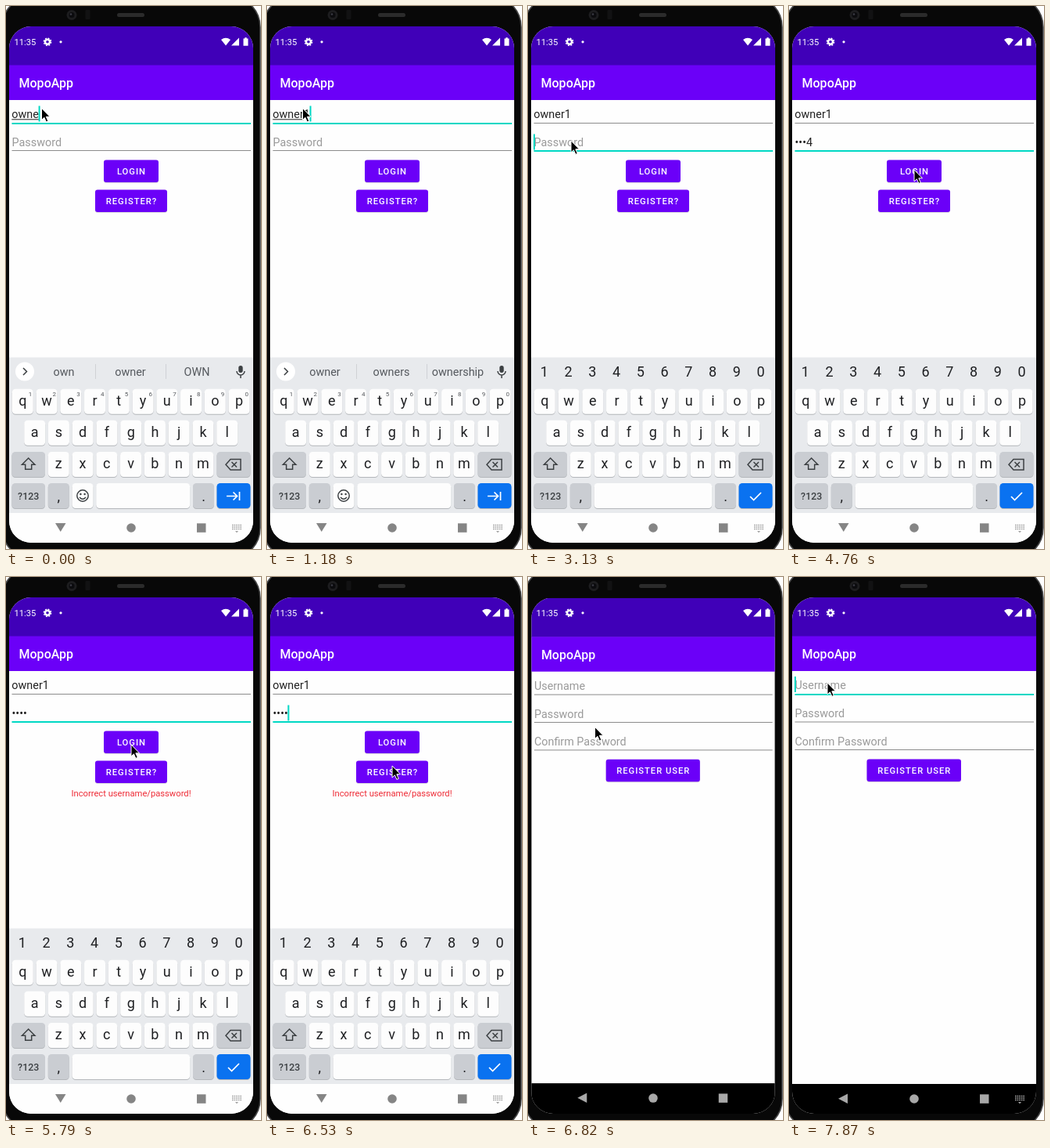
These frames come from a looping animation (326x693 px, 8000 ms). An HTML page:

```html
<!DOCTYPE html>
<html lang="en">
<head>
<meta charset="utf-8">
<title>Login screen</title>
<style>
  html, body { margin: 0; width: 100%; height: 100%; overflow: hidden; background: #fff; }
  svg { display: block; width: 326px; height: 693px; font-family: Roboto, sans-serif; }
  text { white-space: pre; }
  .mid { text-anchor: middle; }
  .field { font-size: 14.4px; fill: #222; }
  .hint { font-size: 14.4px; fill: #9a9a9a; }
  .button { font-size: 11.2px; font-weight: 500; letter-spacing: 1px; fill: #fff; text-anchor: middle; }
  .key { font-size: 18px; fill: #1f2023; text-anchor: middle; }
  .super { font-size: 8px; fill: #55585c; text-anchor: middle; }
  .word { font-size: 14.4px; fill: #55595e; text-anchor: middle; }
  .line { fill: none; stroke: #3c4043; stroke-width: 1.5; }
</style>
</head>
<body>
<svg id="stage" viewBox="0 0 326 693"></svg>
<script>
const LOOP = 8000;
const PURPLE = '#6b00f8', DARK = '#4000b8', TEAL = '#00d8c4', GRAY = '#cacdd2';
const PITCH = 30.75;

const rect = (x, y, w, h, fill, more = '') =>
  `<rect x="${x}" y="${y}" width="${w}" height="${h}" fill="${fill}" ${more}/>`;
const label = (x, y, cls, str, more = '') =>
  `<text x="${x}" y="${y}" class="${cls}" ${more}>${str}</text>`;
const path = (d, more = 'class="line"') => `<path d="${d}" ${more}/>`;
const dot = (x, y, r, fill) => `<circle cx="${x}" cy="${y}" r="${r}" fill="${fill}"/>`;

const button = (x, y, w, str) =>
  rect(x, y + 1, w, 28.5, '#000', 'rx="3" opacity=".13"') +
  rect(x, y, w, 28.5, PURPLE, 'rx="3"') +
  label(x + w / 2 + .5, y + 18.3, 'button', str);

const key = (x, y, w, fill = '#fdfdfd') =>
  rect(x, y + 1, w, 32, '#b4b7bb', 'rx="4.5"') + rect(x, y, w, 32, fill, 'rx="4.5"');

const keyRow = (chars, x, y) => [...chars].map((c, i) =>
  key(x + i * PITCH, y, 27) + label(x + i * PITCH + 13.5, y + 21.3, 'key', c)).join('');

const digits = (draw) => [...'1234567890'].map((c, i) => draw(c, i * PITCH)).join('');

const header =
  rect(4, 26, 312, 50, DARK) + rect(4, 75.5, 312, 44.5, PURPLE) +
  label(16.5, 104, '', 'MopoApp', 'font-size="16" font-weight="500" fill="#fff"');

const underline = (id, y) => rect(7.5, y, 305.5, 1, '#8c8c8c', `id="${id}"`);

function navBar(fill, icon, back) {
  return rect(4, 647, 312, 40, fill) + path(back, `fill="${icon}"`) +
    dot(160, 666, 5.8, icon) + rect(244, 660.3, 11.5, 11.5, icon);
}

const keyboardIcon = (color) =>
  path('M289 662.5h12M289 665h12M289 667.5h12',
    `stroke="${color}" stroke-width="1.6" stroke-dasharray="1.6 1"`) +
  path('M293 670h4l-2 2.3z', `fill="${color}"`);

const loginPage =
  rect(4, 26, 312, 660, '#fefefe') + header +
  label(7.3, 143, 'field', '', 'id="user"') +
  rect(7.3, 144.3, 0, 1, '#222', 'id="comp"') + underline('line1', 149) +
  label(7.5, 179, 'hint', 'Password', 'id="passHint"') +
  label(7.5, 179, 'field', '', 'id="pass"') + underline('line2', 184) +
  button(125, 196.5, 70, 'LOGIN') +
  rect(125, 196.5, 70, 28.5, '#fff', 'rx="3" id="press1"') +
  button(114, 234.5, 92, 'REGISTER?') +
  rect(114, 234.5, 92, 28.5, '#fff', 'rx="3" id="press2"') +
  label(160, 280, 'mid', 'Incorrect username/password!', 'id="error" font-size="11.2" fill="#ee2b36"') +
  rect(0, 127, 2, 20, TEAL, 'id="caret"');

const textMode =
  dot(24, 466.5, 12, '#fff') + path('M22 462l4.5 4.5-4.5 4.5') +
  [74, 159, 244].map((x, i) => label(x, 472, 'word', '', `id="word${i}"`)).join('') +
  path('M114.5 457v19M204.5 457v19', 'id="dividers" stroke="#cfd1d5"') +
  rect(297.3, 459, 5.4, 9, '#3c4043', 'rx="2.7"') +
  path('M295 466a5 5 0 0 0 10 0M300 471v4') +
  digits((c, dx) => label(31 + dx, 497.5, 'super', c)) +
  key(84.5, 609, 27) + `<circle cx="98" cy="625" r="7.2" class="line"/>` +
  dot(95.4, 623, 1.2, '#3c4043') + dot(100.6, 623, 1.2, '#3c4043') +
  path('M94 627q4 4.5 8 0') + key(115.2, 609, 120) +
  path('M282 625.5h13.5m-5-5l5 5-5 5M298.5 620v11', 'fill="none" stroke="#fff" stroke-width="1.7"');

const passMode =
  digits((c, dx) => label(20.8 + dx, 473, 'key', c)) + key(84.5, 609, 150.7) +
  path('M284 626l4.5 4.5 9.5-9.5', 'fill="none" stroke="#fff" stroke-width="1.7"');

const keyboard =
  rect(4, 448.5, 312, 199, '#e8eaed') +
  keyRow('qwertyuiop', 7.8, 488.7) + keyRow('asdfghjkl', 23.2, 528.7) + keyRow('zxcvbnm', 53.8, 569) +
  key(7.5, 569, 42.5, GRAY) + path('M28.7 577l-8.2 8.2h4.2v6h8v-6h4.2z') +
  key(269.5, 569, 43, GRAY) + path('M287 578.5h13v13.5h-13l-6-6.75zM288.5 582l6.5 6.5m0-6.5l-6.5 6.5') +
  key(7.5, 609, 42.5, GRAY) + label(28.7, 630, 'mid', '?123', 'font-size="12.4" font-weight="500" fill="#3c4043"') +
  key(53.8, 609, 27, GRAY) + label(67.3, 632, 'key', ',') +
  key(239, 609, 27, GRAY) + label(252.5, 632, 'key', '.') +
  key(269.5, 609, 43, '#0a72f0') +
  `<g id="textMode">${textMode}</g><g id="passMode">${passMode}</g>` +
  navBar('#fefefe', '#858585', 'M63 660h13.5l-6.75 11z') + keyboardIcon('#a0a0a0');

const registerPage =
  rect(4, 26, 312, 660, '#fefefe') + header +
  ['Username', 'Password', 'Confirm Password'].map((s, i) =>
    label(7.5, 143 + i * 36, 'hint', s) + underline('reg' + i, 149 + i * 35.5)).join('') +
  button(99.5, 232.5, 120.5, 'REGISTER USER') +
  rect(7, 127, 2, 20, TEAL, 'id="regCaret"') +
  navBar('#000', '#a8a8a8', 'M75 659.5v12.5l-12-6.25z') +
  `<g id="regIcon">${keyboardIcon('#a8a8a8')}</g>`;

const statusIcons =
  label(10.5, 50, '', '11:35', 'font-size="11.2" fill="#fff"') +
  `<circle cx="53" cy="45.8" r="3" fill="none" stroke="#fff" stroke-width="2.4"/>
   <circle cx="53" cy="45.8" r="4.7" fill="none" stroke="#fff" stroke-width="1.3" stroke-dasharray="2 1.69"/>` +
  dot(70, 45.8, 1.6, '#fff') +
  path('M275 43q6-4.6 12 0l-6 7.5zM298 40.5v10h-10z', 'fill="#fff"') +
  path('M303.5 41.5h1.8v-1.3h2.4v1.3h1.8v9.3h-6z', 'fill="#fff"');

const bezel =
  rect(-5, -13, 330, 719, '#080808', 'rx="40" stroke="#484848" stroke-width="1.6"') +
  dot(84, 11.5, 6.5, '#1d1d1f') + dot(84, 11.5, 3.5, '#0b0b0e') + dot(83, 10.5, 1.3, '#3b3b44') +
  rect(101.5, 5, 6, 12, '#121213', 'rx="1"') +
  rect(142, 9, 35, 5, '#2b2b2b', 'rx="2.5"');

const stage = document.getElementById('stage');
stage.innerHTML = `
  <defs>
    <clipPath id="screen"><rect x="4" y="26" width="312" height="659" rx="28"/></clipPath>
  </defs>
  ${bezel}
  <g clip-path="url(#screen)">
    <g id="login">${loginPage}</g>
    <g id="register">${registerPage}</g>
    <g id="ime">${keyboard}</g>
    ${statusIcons}
  </g>
  <path id="mouse" d="M0 0v15l3.4-3.2 2.5 5.6 2.4-1.1-2.5-5.5h4.7z"
    fill="#000" stroke="#fff"/>`;

const el = {};
stage.querySelectorAll('[id]').forEach(n => el[n.id] = n);
const set = (id, attrs) => { for (const k in attrs) el[id].setAttribute(k, attrs[k]); };
const show = (id, on) => { el[id].style.display = on ? '' : 'none'; };

// Scales a page about the middle of the screen.
const zoom = (id, k) =>
  set(id, { transform: `translate(160 355.5) scale(${k}) translate(-160 -355.5)` });

const pen = document.createElement('canvas').getContext('2d');
const widthOf = str => { pen.font = '14.4px Roboto, sans-serif'; return pen.measureText(str).width; };

// Each step overrides part of the state; "left" is the share of the page transition still to run.
const steps = [
  [0, { user: 'owne', comp: 'owne', pass: '', focus: 1, caret: 1, words: ['own', 'owner', 'OWN'],
        secret: 0, error: 0, press: 0, mouse: [45.5, 130.5], left: 1, regFocus: 0, regIcon: 0 }],
  [140, { user: 'owner', words: ['owne', 'owner', 'OWNE'] }],
  [440, { comp: 'owner', words: ['owner', 'owners', 'ownership'] }],
  [890, { caret: 0 }],
  [1180, { user: 'owner1', caret: 1 }],
  [1330, { comp: 'owner1', words: ['', 'owner1', ''] }],
  [1480, { mouse: [55, 172] }],
  [1930, { focus: 2, comp: '' }],
  [2230, { secret: 1 }],
  [2530, { caret: 0 }],
  [3130, { caret: 1 }],
  [3280, { pass: '1' }],
  [3570, { pass: '•2' }],
  [3870, { pass: '••3' }],
  [4010, { pass: '•••4' }],
  [4310, { mouse: [78, 180] }],
  [4460, { mouse: [116, 193], caret: 0 }],
  [4610, { mouse: [148, 204] }],
  [4760, { mouse: [160, 209] }],
  [5050, { press: 1, caret: 1 }],
  [5200, { error: 1 }],
  [5350, { press: 0 }],
  [5500, { pass: '••••', caret: 0 }],
  [5790, { mouse: [160, 214] }],
  [5940, { mouse: [160, 223] }],
  [6090, { mouse: [160, 233], caret: 1 }],
  [6240, { mouse: [160, 241] }],
  [6380, { press: 2 }],
  [6530, { press: 0 }],
  [6670, { left: .3, mouse: [148, 233] }],
  [6820, { left: .02, mouse: [85.5, 191.5] }],
  [6970, { left: 0, mouse: [75, 178] }],
  [7120, { mouse: [66, 163] }],
  [7270, { mouse: [57, 149] }],
  [7420, { mouse: [51, 139] }],
  [7570, { mouse: [49, 135] }],
  [7720, { regFocus: 1 }],
  [7870, { regIcon: 1 }]
];

const focusLine = (id, on) => set(id, { height: on ? 2 : 1, fill: on ? TEAL : '#8c8c8c' });

function draw(t) {
  const s = Object.assign({}, ...steps.filter(([at]) => at <= t).map(([, part]) => part));
  const moving = s.left < 1, leaving = s.left > .1;

  el.user.textContent = s.user;
  el.pass.textContent = s.pass;
  set('comp', { width: widthOf(s.comp) });
  show('passHint', !s.pass);
  focusLine('line1', s.focus === 1);
  focusLine('line2', s.focus === 2);
  show('caret', s.caret);
  const typed = s.focus === 1 ? s.user : s.pass;
  set('caret', { x: 7 + widthOf(typed), y: s.focus === 1 ? 127.5 : 163.5 });
  show('error', s.error);
  [1, 2].forEach(n => set('press' + n, { opacity: s.press === n ? .16 : 0 }));

  s.words.forEach((w, i) => el['word' + i].textContent = w);
  show('dividers', s.words[0]);
  show('textMode', !s.secret);
  show('passMode', s.secret);

  show('login', leaving);
  show('ime', leaving);
  show('register', moving);
  set('ime', { opacity: moving ? .5 : 1, transform: `translate(0 ${moving ? 12 : 0})` });
  zoom('login', 1 + .05 * (1 - s.left));
  zoom('register', 1 - .15 * s.left);
  focusLine('reg0', s.regFocus);
  show('regCaret', s.regFocus);
  show('regIcon', s.regIcon);

  set('mouse', { transform: `translate(${s.mouse})` });
}

function tick() {
  draw(performance.now() % LOOP);
  requestAnimationFrame(tick);
}
tick();
</script>
</body>
</html>
```
